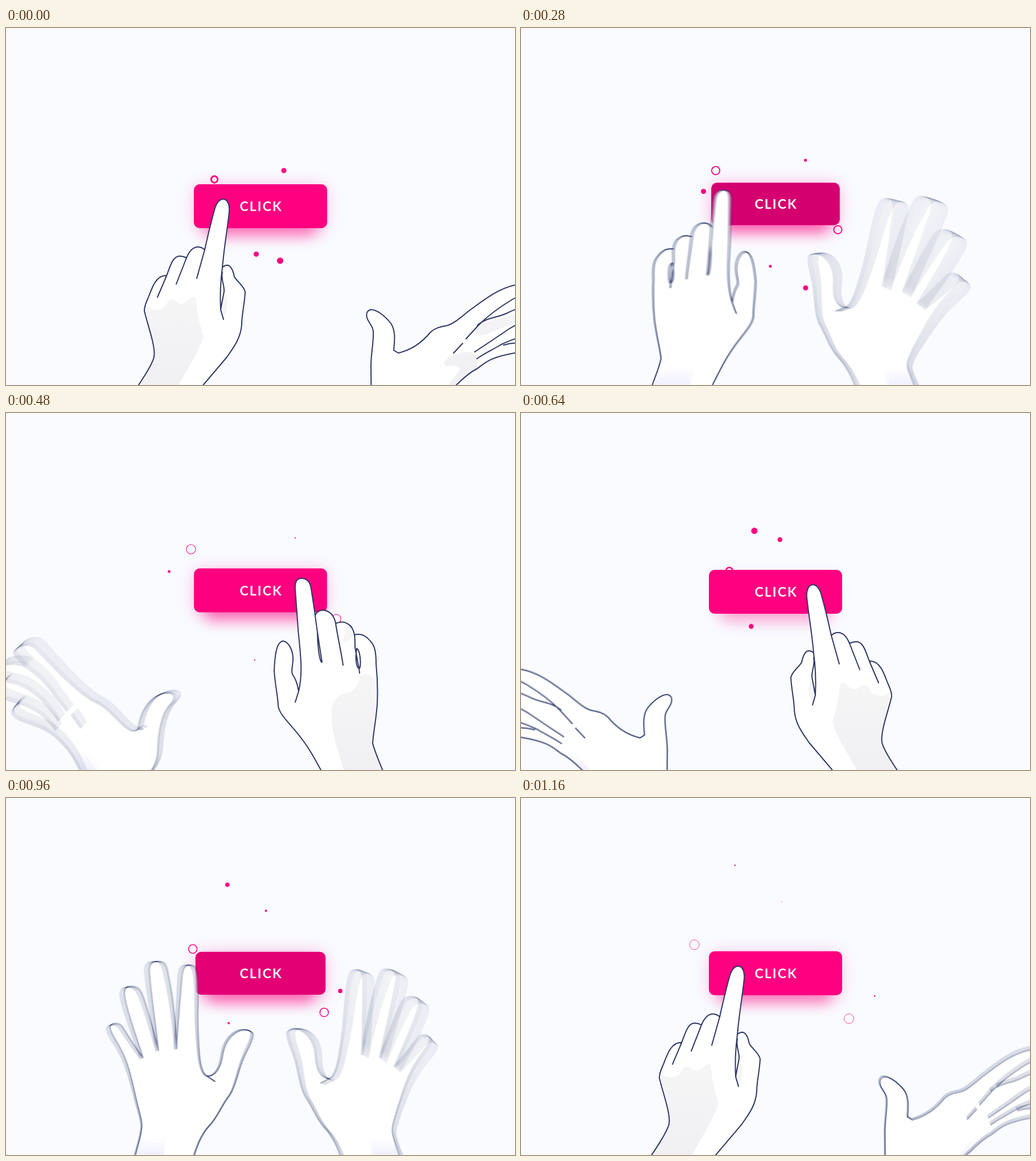
Recreate the animation shown at these times as an HTML page with a canvas. Size 894x626 px, loop 1.2 s.

```html
<!DOCTYPE html>
<html lang="en">
<head>
<meta charset="utf-8">
<title>Click</title>
<style>
html, body { margin: 0; width: 100%; height: 100%; overflow: hidden; background: #f9fbff; }
canvas { display: block; width: 100vw; height: 100vh; }
</style>
</head>
<body>
<canvas id="stage" width="894" height="626"></canvas>
<script>
const W = 894, H = 626, LOOP = 1200, BEAT = 600, STEP = 40;
const INK = '#2e3766', PINK = '#ff0080';
const CX = 447, CY = 310.75;

const layer = () => Object.assign(document.createElement('canvas'), { width: W, height: H }).getContext('2d');
const ctx = document.getElementById('stage').getContext('2d');
const copy = layer(), sum = layer();

const clamp = v => Math.min(1, Math.max(0, v));

// Linear interpolation of [time, ...values] rows
function at(keys, t) {
  let i = 0;
  while (i < keys.length - 2 && t > keys[i + 1][0]) i++;
  const a = keys[i], b = keys[i + 1];
  const p = clamp((t - a[0]) / (b[0] - a[0]));
  return a.slice(1).map((v, n) => v + (b[n + 1] - v) * p);
}

// Left-hand poses; the right hand is the mirror image half a loop later
const press = {
  pivot: [320, 600],
  body: 'M190 690 C215 650 254 600 260 577 C263 558 249 522 243 496 C243 486 247 480 251 470 C257 454 264 434 281 434 L281 437 ' +
    'C288 420 292 400 305 400 C311 400 315 402 317 403 C322 391 329 384 337 384 C343 384 347 387 349 389 ' +
    'C355 362 363 330 367 316 C371 304 377 300 382 300 C390 301 393 312 392 322 C389 352 383 385 380 420 ' +
    'C381 418 385 416 389 416 C396 417 399 426 401 436 C406 445 418 452 420 463 C419 485 414 502 414 520 C412 546 398 562 388 577 L292 690 Z',
  shade: 'M246 486 C254 498 270 497 280 488 C284 476 290 473 298 478 C306 488 316 482 322 476 C328 469 333 470 334 478 ' +
    'C335 500 342 525 347 541 C335 580 305 615 270 690 L190 690 C215 650 254 600 260 577 C263 558 249 522 246 486 Z ' +
    'M383 462 C390 475 392 492 382 508 L377 494 Z',
  lines: 'M281 437 L266 472 M317 403 L299 449 M349 389 L335 439 M380 420 C376 450 376 475 377 494 L382 511 ' +
    'M380 428 C377 440 384 452 383 462 L377 494'
};
const point = {
  pivot: [290, 600],
  body: 'M206 690 C220 655 246 598 250 579 C249 560 244 540 242 510 C241 490 241 470 244 440 C244 420 246 408 254 400 ' +
    'C262 390 272 386 282 389 C284 380 288 373 292 371 C298 366 306 365 315 369 C317 358 322 349 334 346 C342 345 348 348 351 355 ' +
    'C353 340 356 322 358 308 C360 296 365 290 375 290 C383 290 387 296 386 308 C384 340 382 360 381 380 C377 420 372 455 380 488 ' +
    'C382 475 386 465 391 458 C394 450 389 440 390 428 C391 415 398 400 408 400 C420 402 422 430 423 452 ' +
    'C421 480 416 500 416 513 C414 530 394 545 374 572 C357 594 349 612 306 690 Z',
  shade: 'M242 470 C250 462 262 452 273 460 C274 484 290 492 300 492 C312 494 322 508 322 525 C324 560 312 590 280 690 ' +
    'L206 690 L250 579 C249 560 244 540 242 470 Z M282 389 C288 395 296 405 302 400 L296 372 Z',
  lines: 'M282 389 C281 395 281 405 281 410 C278 430 274 445 273 456 M278 413 C272 415 270 440 273 448 C279 448 281 430 278 413 ' +
    'M315 369 C311 395 305 420 302 442 M351 355 C348 380 343 410 339 437 M347 385 C347 405 344 432 340 437 M380 488 L386 507'
};
const spread = {
  pivot: [357, 490],
  body: 'M318 690 C322 650 334 600 356 576 C372 560 378 540 390 525 C402 510 407 480 415 460 C422 442 433 426 433 413 ' +
    'C428 404 412 405 402 412 C390 420 383 432 380 450 C377 472 368 488 354 488 C340 484 338 450 336 400 ' +
    'C335 375 337 350 335 318 C333 298 330 293 321 293 C311 293 308 302 307 318 C304 360 300 400 299 440 ' +
    'C297 400 292 350 283 310 C280 290 275 287 265 287 C253 287 249 294 250 306 C253 345 262 400 267 443 ' +
    'C257 405 247 368 238 346 C233 333 226 331 217 331 C207 331 205 340 207 350 C212 378 228 420 240 456 ' +
    'C224 436 212 415 203 402 C198 394 184 395 182 401 C180 410 192 425 200 440 C215 466 222 502 230 535 ' +
    'C235 555 240 570 238 580 C236 600 228 615 222 650 L218 690 Z',
  shade: 'M208 456 C225 446 255 458 264 472 C276 510 283 545 283 575 C282 610 274 640 268 690 L218 690 L222 650 L238 580 L230 535 Z',
  lines: 'M354 488 L367 497'
};
const tilt = {
  pivot: [268, 507],
  body: 'M268 690 L268 630 C268 608 271 600 280 588 C292 575 299 562 300 545 C302 520 308 490 322 472 C330 463 338 458 335 450 ' +
    'C328 443 310 446 300 452 C285 462 273 480 268 505 C258 512 250 503 243 496 C228 480 215 460 197 451 ' +
    'C170 435 130 385 102 350 C92 336 66 341 62 353 C66 364 74 369 82 380 C62 366 25 372 22 391 C28 400 36 398 44 402 ' +
    'C30 406 26 420 31 427 C40 434 55 438 66 443 C54 444 48 455 52 462 C62 476 97 482 116 500 ' +
    'C140 522 155 550 166 580 C174 600 178 612 180 630 L186 690 Z',
  shade: 'M122 492 C150 480 160 490 172 500 C180 505 176 520 168 520 C185 560 205 600 210 690 L186 690 L166 580 C155 550 140 522 122 500 Z',
  lines: 'M82 380 C100 395 118 415 128 436 L146 462 M154 470 L168 494 M44 402 C75 408 90 425 105 440 C115 455 125 465 130 478 ' +
    'M66 443 C90 452 110 470 124 494 M268 505 L275 506'
};
const rest = {
  pivot: [211, 569],
  body: 'M-80 452 C-50 448 -20 446 0 450 C32 455 60 478 85 496 C100 508 112 519 124 522 C136 524 144 526 152 533 ' +
    'C168 552 185 564 209 570 L217 565 C215 545 214 530 222 518 C234 503 248 493 258 494 C266 497 265 503 264 508 ' +
    'C261 518 254 521 253 532 C252 552 257 570 257 592 L256 690 L150 690 C140 660 120 636 107 626 C95 614 82 603 70 597 ' +
    'C55 586 48 577 0 569 L-80 558 Z',
  shade: 'M-40 495 C0 500 45 512 70 521 C80 535 70 542 55 538 C30 525 10 520 -40 505 Z M72 575 C85 562 100 570 112 574 ' +
    'C130 582 135 592 118 593 C108 592 103 592 100 598 C115 620 130 630 150 690 L107 626 C95 614 82 603 70 597 Z',
  lines: 'M-40 456 C-20 463 0 470 12 478 C35 492 55 508 68 521 L90 545 M96 553 L112 570 M-40 478 C-20 485 0 491 18 500 ' +
    'C35 508 55 508 70 521 M-40 500 C-20 510 0 518 15 528 C40 545 55 555 75 568 ' +
    'M-40 530 C-20 538 10 545 30 556 C45 565 60 572 71 580 M-40 564 C-20 552 0 549 24 556'
};

// Rows: start, pose, keys of [time, dx, dy, degrees, finger stretch]
const moves = [
  [0, press],
  [220, point, [[240, 0, 0, -0.5, 0], [280, -3, -2, -3, 0], [320, -6, 0, -6, 0]]],
  [300, spread, [[320, -14, 4, 0.5, 0], [360, -28, 4, -6.5, 0], [400, -57, 18, -15, 0], [440, -90, 40, -24, 0]]],
  [420, tilt, [[400, 32, 2, 8, 0], [440, -2, 25, 1, 0], [480, -33, 48, -4, 0], [520, -50, 58, -8, 0]]],
  [500, rest, [[480, 24, -26, 7, 0], [520, 6, -16, 4, 0], [560, -2, -6, 0.9, 0], [600, -4, 0, 0, 0],
    [640, 0, 0, 0, 0], [680, 4, -4, 1, 0], [720, 18, -20, 5, 0], [760, 38, -40, 9, 0]]],
  [740, tilt, [[720, -40, 42, -8, 0], [760, -20, 22, -4, 0], [800, 0, 0, 0, 0], [840, 26, -8, 6, 0], [880, 52, -14, 12, 0]]],
  [860, spread, [[840, -60, 6, -23, 0.13], [880, -30, 2, -14.5, 0.11], [920, -9, 0, -5, 0.05], [960, 0, 0, 0, 0], [1000, 5, 0, 2.5, 0]]],
  [1020, point, [[1000, -6, 4, -3, 0], [1040, -2, 1, -1, 0], [1065, 0, 0, 0, 0], [1120, 0, 0, 0, 0]]],
  [1100, press]
];

// Rows: time, button centre y, squeeze, glow
const beat = [
  [0, 312.5, 0, 0.8], [40, 313.5, 0, 0.1], [80, 315, 0.25, 0.4], [160, 317, 0.8, 0.9], [200, 317, 1, 1],
  [240, 312, 0.92, 1], [280, 308.5, 0.82, 1], [360, 307.4, 0.54, 1], [480, 311, 0.03, 0.9],
  [520, 307.3, 0, 0.8], [560, 307.3, 0, 0.75]
];

// Rows: x, y, speed x, speed y, size, fade power (size 0 is a ring)
const sparks = [
  [366, 265.5, -0.0857, -0.0553, 0],
  [523.5, 343.2, 0.1178, 0.0375, 0],
  [488, 250, 0.0415, -0.0645, 4.6, 1],
  [439.5, 396.5, -0.0057, 0.076, 4.6, 1],
  [481.5, 408, 0.0657, 0.1705, 5.6, 2],
  [368.1, 298.4, -0.17, -0.0425, 5.6, 2]
];

// Moves a path; the turn fades out down the forearm
function bend(path, [px, py], [dx, dy, deg, grow]) {
  return new Path2D(path.replace(/(-?\d+) (-?\d+)/g, (m, x, y) => {
    const u = x - px, v = y - py;
    const hold = 1 - clamp(v / 140);
    const a = deg * hold * Math.PI / 180, c = Math.cos(a), s = Math.sin(a);
    const k = 1 + grow * hold * clamp(-u / 80);
    return `${(px + dx + k * (u * c - v * s)).toFixed(2)} ${(py + dy + k * (u * s + v * c)).toFixed(2)}`;
  }));
}

function drawPose(g, pose, shift) {
  const body = bend(pose.body, pose.pivot, shift);
  g.fillStyle = '#fff';
  g.fill(body);
  g.save();
  g.clip(body);
  const tone = g.createLinearGradient(0, 470, 0, H);
  tone.addColorStop(0, '#f5f5f6');
  tone.addColorStop(1, '#f0f0f3');
  g.fillStyle = tone;
  g.fill(bend(pose.shade, pose.pivot, shift));
  g.restore();
  g.strokeStyle = INK;
  g.lineWidth = 2;
  g.lineJoin = g.lineCap = 'round';
  g.stroke(body);
  g.stroke(bend(pose.lines, pose.pivot, shift));
}

function drawHand(t, mirror) {
  const [, pose, keys] = moves.filter(m => m[0] <= t).pop();
  const shiftAt = s => keys ? at(keys, s) : [0, at(beat, t % BEAT)[0] - 312.5, 0, 0];
  const a = shiftAt(t - 10), b = shiftAt(t + 10);
  const travel = Math.hypot(b[0] - a[0], b[1] - a[1]) + Math.abs(b[2] - a[2]) * 3;

  ctx.save();
  if (mirror) { ctx.translate(W, 0); ctx.scale(-1, 1); }
  if (travel < 2.5) {
    drawPose(ctx, pose, shiftAt(t));
  } else {
    // Motion blur: equal shares of the hand across the open shutter
    const n = 16;
    sum.clearRect(0, 0, W, H);
    sum.globalCompositeOperation = 'lighter';
    sum.globalAlpha = 1 / n;
    for (let i = 0; i < n; i++) {
      copy.clearRect(0, 0, W, H);
      drawPose(copy, pose, shiftAt(t - 10 + 20 * (i + 0.5) / n));
      sum.drawImage(copy.canvas, 0, 0);
    }
    ctx.drawImage(sum.canvas, 0, 0);
  }
  ctx.restore();
}

function glow(x, y, w, h, blur, alpha) {
  ctx.save();
  ctx.shadowColor = `rgba(255,0,128,${alpha})`;
  ctx.shadowBlur = blur;
  ctx.shadowOffsetX = 2000;
  ctx.fillStyle = '#000';
  ctx.beginPath();
  ctx.roundRect(x - 2000, y, w, h, 10);
  ctx.fill();
  ctx.restore();
}

function drawSparks(t, flip) {
  ctx.save();
  if (flip) { ctx.translate(2 * CX, 2 * CY); ctx.scale(-1, -1); }
  ctx.fillStyle = ctx.strokeStyle = PINK;
  for (const [x, y, vx, vy, size, power] of sparks) {
    const r = size ? size * (1 - (t / 640) ** power) : 5.7 + 0.005 * t;
    ctx.beginPath();
    ctx.arc(x + vx * t, y + vy * t, r, 0, 7);
    if (size) ctx.fill();
    else { ctx.lineWidth = 2.9 - 0.0039 * t; ctx.stroke(); }
  }
  ctx.restore();
}

function draw(t) {
  const phase = t % BEAT;
  const [y, squeeze, halo] = at(beat, phase);
  const k = 1 - 0.043 * squeeze, w = 234 * k, h = 77 * k;
  const x = CX - w / 2, top = y - h / 2;

  ctx.fillStyle = '#f9fbff';
  ctx.fillRect(0, 0, W, H);
  glow(x + 2, top + 3, w - 4, h + 2, 30, 0.3 * halo);
  glow(x + 20, top + 24, w - 40, h - 10, 24, 0.3 + 0.2 * halo);
  drawSparks(phase, t >= BEAT);

  ctx.fillStyle = `rgb(${255 - 51 * squeeze},0,${128 - 20 * squeeze})`;
  ctx.beginPath();
  ctx.roundRect(x, top, w, h, 10);
  ctx.fill();

  ctx.fillStyle = '#fff';
  ctx.font = 'bold 23px Lato, sans-serif';
  ctx.letterSpacing = '2.1px';
  ctx.textAlign = 'center';
  ctx.fillText('CLICK', CX + 1.2, y + 8.8);

  drawHand(t, false);
  drawHand((t + BEAT) % LOOP, true);
}

const start = performance.now();
let shown = -1;
function tick() {
  const t = Math.floor((performance.now() - start + 8) / STEP) * STEP % LOOP;
  if (t !== shown) draw(shown = t);
  requestAnimationFrame(tick);
}
tick();
</script>
</body>
</html>
```
